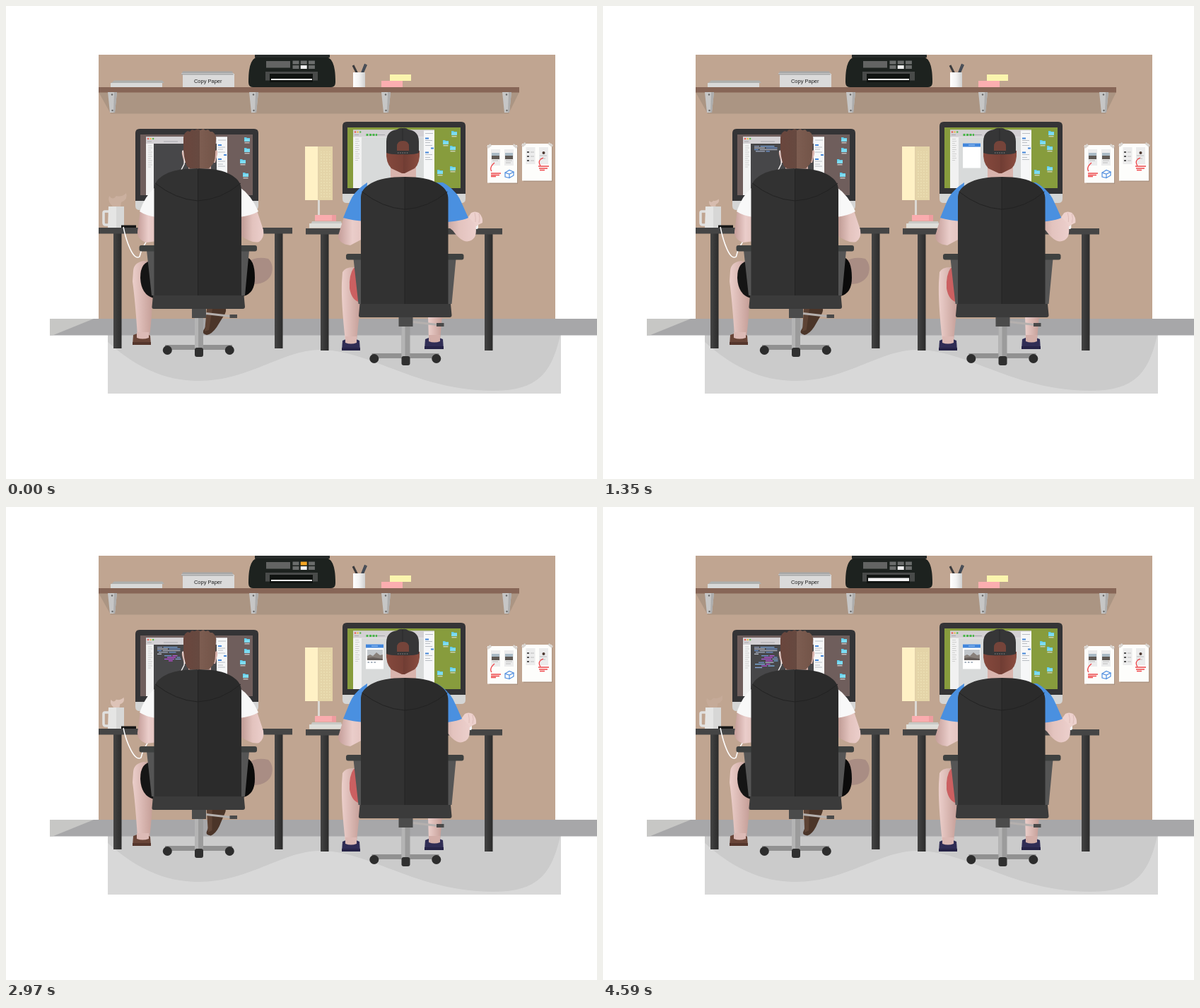
An HTML page that plays this animation: 836x670 px, repeating every 4860 ms.

```html
<!DOCTYPE html>
<html lang="en">
<head>
<meta charset="utf-8">
<title>Two people at work</title>
<style>
  html, body { margin: 0; width: 100%; height: 100%; overflow: hidden; background: #fff; }
  svg { display: block; width: 100vw; height: 100vh; }
  text { font: 7.5px "Liberation Sans", Arial, sans-serif; }
</style>
</head>
<body>
<svg viewBox="0 0 836 670" xmlns="http://www.w3.org/2000/svg">
  <defs>
    <linearGradient id="skin">
      <stop offset="0" stop-color="#eccfcb"/><stop offset="1" stop-color="#c49d96"/>
    </linearGradient>
    <linearGradient id="skinBack">
      <stop offset="0" stop-color="#c49d98"/><stop offset=".55" stop-color="#eacdca"/><stop offset="1" stop-color="#e3c3bf"/>
    </linearGradient>
    <linearGradient id="skinFront">
      <stop offset="0" stop-color="#b9948d"/><stop offset=".55" stop-color="#e3c3be"/><stop offset="1" stop-color="#eccfcc"/>
    </linearGradient>
    <linearGradient id="leg">
      <stop offset="0" stop-color="#444"/><stop offset="1" stop-color="#2b2b2b"/>
    </linearGradient>
    <linearGradient id="cup">
      <stop offset="0" stop-color="#fff"/><stop offset=".5" stop-color="#f2f2f2"/><stop offset="1" stop-color="#cfcfcf"/>
    </linearGradient>
    <linearGradient id="hair">
      <stop offset="0" stop-color="#6a463d"/><stop offset=".5" stop-color="#664940"/>
      <stop offset=".5" stop-color="#7d5d51"/><stop offset="1" stop-color="#735448"/>
    </linearGradient>
    <linearGradient id="redHair">
      <stop offset="0" stop-color="#85493d"/><stop offset=".5" stop-color="#784137"/>
      <stop offset=".5" stop-color="#6f3c33"/><stop offset="1" stop-color="#8a4d40"/>
    </linearGradient>
    <pattern id="dots" width="4" height="4" patternUnits="userSpaceOnUse">
      <circle cx="2" cy="2" r=".8" fill="#f2e7bd"/>
    </pattern>

    <g id="folder">
      <path d="M-4-3h3l1 1h4v5h-8z" fill="#62cdea"/>
      <path d="M-3-1h7v4h-8z" fill="#7fdcf2"/>
      <path d="M-3.500 4.800h7" stroke="#e8e8e8" stroke-width="1"/>
    </g>

    <g id="bracket">
      <path d="M-6 122H7L4 151H-3Z" fill="#c6c6c6"/>
      <path d="M3 122H7L4 151H2Z" fill="#adadad"/>
      <circle cy="125.500" r="1.200" fill="#666"/><circle cx=".5" cy="148" r="1.200" fill="#666"/>
    </g>

    <g id="monitor">
      <path d="M183 270V283Q183 289 189 289H351Q357 289 357 283V270Z" fill="#d4d5d5"/>
      <path d="M183 276V180Q183 174 189 174H351Q357 174 357 180V276Z" fill="#343436"/>
    </g>

    <g id="win">
      <rect x="198" y="185" width="115" height="83" fill="#f1f1f1"/>
      <rect x="198" y="185" width="115" height="10" fill="#d3d0d3"/>
      <circle cx="201" cy="188" r="1.200" fill="#ee5b54"/>
      <circle cx="204.600" cy="188" r="1.200" fill="#f0c04c"/>
      <circle cx="208.200" cy="188" r="1.200" fill="#55b54c"/>
      <path d="M200 192h6M223 192h20" stroke="#a9a9ad"/>
      <path d="M201 198h5m-5 3h6m-6 3h4m-4 3h6m-6 3h5m-5 3h6m-6 3h4m-4 3h6m-6 3h5m-5 3h6m-6 3h4" stroke="#cfcfcf"/>
      <rect x="298" y="186" width="15" height="82" fill="#f6f7f8"/>
      <path d="M300 190h11m-11 10h10m-10 3h7m-7 4h10m-10 13h10m-10 4h7m-7 3h10" stroke="#b9bdc3"/>
      <path d="M300 197h5m3 14h4M300 217h5" stroke="#4788d8" stroke-width="2"/>
    </g>

    <g id="chair">
      <rect x="225" y="480" width="95" height="7" fill="#919191"/>
      <rect x="267" y="440" width="12" height="46" fill="#9b9b9b"/>
      <rect x="267" y="440" width="5" height="46" fill="#b4b4b4"/>
      <circle cx="228.300" cy="487.500" r="6.500" fill="#2d2d2d"/>
      <circle cx="316.300" cy="487.500" r="6.500" fill="#2d2d2d"/>
      <rect x="267" y="484" width="12" height="13" rx="3" fill="#303030"/>
      <path d="M283 435.500L318 439.500" stroke="#b5b0ae" stroke-width="3"/>
      <rect x="316.500" y="437" width="10.500" height="5" fill="#4a4a4a"/>
      <rect x="263" y="429" width="20" height="13" fill="#4b4b4b"/>
      <path d="M199 346H212V410H206ZM331 346H344L338 410H331Z" fill="#555"/>
      <rect x="188.500" y="339" width="28" height="8.500" rx="3" fill="#3e4140"/>
      <rect x="327" y="339" width="28" height="8.500" rx="3" fill="#3e4140"/>
      <path d="M209.500 410V262C209 251 214 245 224 239Q240 230 271.500 230V410Z" fill="#323232"/>
      <path d="M333 410V262C333 251 328 245 318 239Q303 230 271.500 230V410Z" fill="#2b2b2b"/>
      <path d="M211 251Q240 274 271.500 276Q305 274 332 251M271.500 231V410" fill="none" stroke="#222"/>
      <path d="M208 410H336.500L338 426Q338 429 335 429H209Q206 429 206.500 426Z" fill="#3b3b3b"/>
    </g>
  </defs>

  <rect width="836" height="670" fill="#fff"/>

  <!-- room -->
  <rect x="131" y="69" width="646" height="374" fill="#c0a591"/>
  <rect x="144" y="466" width="641" height="83" fill="#d8d8d8"/>
  <path d="M144 466V476C180 508 220 531 272 531C345 531 390 487 445 487C515 487 580 545 690 545C752 545 772 520 784 466Z" fill="#cbcbcb"/>
  <rect x="62" y="443" width="774" height="23.500" fill="#a7a7a9"/>
  <path d="M62 443H124L66 466.500H62Z" fill="#c7c7c5"/>

  <!-- shelf -->
  <path d="M131 122H726L711 152.500H148Z" fill="#ab9583"/>
  <rect x="131" y="115" width="595" height="7.500" fill="#876657"/>
  <g id="brackets"></g>
  <rect x="148" y="109" width="73" height="6" fill="#d8d9d8"/>
  <path d="M153 105.500H221L224 109H149Z" fill="#aeb0ae"/>
  <rect x="250" y="96" width="73" height="19" fill="#dadada"/>
  <path d="M250 92.500H320L322 97.500H248Z" fill="#a6a7a7"/>
  <path d="M248 95.500H322" stroke="#c8c8c8"/>
  <text x="285.700" y="108.700" text-anchor="middle" fill="#222">Copy Paper</text>
  <path d="M353 73Q346 77 344 91Q343 97 343 108Q343 115 349 115H460Q466 115 466 108Q466 97 465 91Q463 77 456 73Z" fill="#1d221f"/>
  <rect x="352" y="69" width="106" height="4" fill="#272b2a"/>
  <rect x="368" y="78" width="34" height="9.500" fill="#636463"/>
  <g id="buttons"></g>
  <rect x="367" y="93" width="74" height="12.500" fill="#494b4a"/>
  <path d="M373 96H434V108H373Z" fill="#111412"/>
  <rect id="print" x="375" width="58" fill="#f3f3f3"/>
  <path d="M502 97L508 82M504 97L510 83" stroke="#414954" stroke-width="2"/>
  <path d="M497 96L491 84" stroke="#3b3b3d" stroke-width="3"/>
  <rect x="491" y="94" width="17" height="21" fill="url(#cup)"/>
  <rect x="531" y="106" width="30" height="9" fill="#fbaeb0"/>
  <rect x="543" y="97" width="30" height="9" fill="#faf5ae"/>

  <!-- pinned sheets -->
  <g id="sheets">
    <path d="M682 198H724V252H684ZM731 196H773V249H732Z" fill="#9f8877" opacity=".6"/>
    <rect x="681" y="197" width="42" height="53.500" fill="#fdfdfb"/>
    <rect x="730" y="195" width="42" height="52.500" fill="#fdfdfb"/>
    <path d="M680 199l5-4 2 3-5 4zM718 195l6 4-2 3-5-4zM729 197l5-4 2 3-5 4zM768 193l6 4-2 3-5-4z" fill="#d9d4cf"/>
    <g fill="#ececec">
      <rect x="686" y="203" width="13" height="23"/><rect x="705" y="203" width="13" height="23"/>
      <rect x="735.500" y="200" width="13" height="24"/><rect x="754" y="200" width="13" height="24"/>
    </g>
    <path d="M687 208h11v4h-11zM706 208h11v4h-11z" fill="#a9bac5"/>
    <path d="M687 212h11v5h-11zM706 212h11v5h-11z" fill="#605a55"/>
    <path d="M688 219h8m11 0h9m-9 3h7M742 207h5m-5 6h5m-5 6h5m8-7h10m-10 4h8" stroke="#bbb"/>
    <path d="M737 207h3m-3 6h3m-3 6h3" stroke="#555" stroke-width="2"/>
    <circle cx="760.500" cy="208" r="2" fill="#4b3931"/>
    <g fill="none" stroke="#ee4548" stroke-width="1.300">
      <path d="M691 222Q683 229 687 234M686 237h14m-14 2.500h12m-12 2h7M760 215Q751 219 756 226M753 227h15m-14 3h12m-11 2.500h7"/>
    </g>
    <path d="M706 236l6-3.500 6 2.500-6 3zM706 236v6l6 1.500v-5.500M712 243.500l6-3.500v-5" fill="none" stroke="#4e8de0" stroke-width="1.200"/>
  </g>

  <!-- left monitor -->
  <use href="#monitor"/>
  <rect x="190" y="182" width="159" height="86" fill="#6f5e5c"/>
  <use href="#win"/>
  <rect x="209" y="195" width="89" height="73" fill="#474749"/>
  <g id="code"></g>
  <g id="foldersL"></g>

  <!-- right monitor -->
  <use href="#monitor" x="293" y="-10"/>
  <rect x="483" y="172" width="160" height="86" fill="#879c3d"/>
  <use href="#win" x="293" y="-9.500"/>
  <rect x="503" y="186" width="88" height="72" fill="#d8dada"/>
  <rect x="607" y="176" width="36" height="82" fill="#879c3d"/>
  <path d="M509.500 182.500h3m1.500 0h3m1.500 0h3m1.500 0h2" stroke="#49b749" stroke-width="3"/>
  <rect x="483" y="258" width="160" height="7" fill="#343436"/>
  <rect x="190" y="268" width="159" height="7" fill="#343436"/>
  <g id="app">
    <rect x="509" y="194.500" width="25" height="35" fill="#fff"/>
    <rect x="509" y="194.500" width="25" height="5" fill="#4286db"/>
    <path d="M517 197h9" stroke="#a9cbf3"/>
    <path id="icons" d="M511.500 220h2.500m2 0h2.500m2 0h2.500" stroke="#aab4c0" stroke-width="2"/>
    <g id="photo">
      <rect x="511" y="202" width="22" height="15" fill="#c2c7cb"/>
      <path d="M511 217V211L515 209L519 211L524 206L529 210L533 209V217Z" fill="#89817b"/>
      <path d="M511 217V214L519 213L533 215V217Z" fill="#645c58"/>
    </g>
  </g>
  <g id="foldersR"></g>

  <!-- lamp, desks -->
  <rect x="441" y="274" width="3" height="23" fill="#dcd9d4"/>
  <rect x="423" y="199" width="18.500" height="76" fill="#fff1c5"/>
  <rect x="441.500" y="199" width="20.500" height="76" fill="#e4d4a8"/>
  <rect x="444" y="206" width="16" height="65" fill="url(#dots)"/>
  <path d="M433 305H474L477 314H429Z" fill="#c9c9c5"/>
  <rect x="429" y="308" width="47" height="6.500" fill="#deded9"/>
  <rect x="437" y="296" width="30" height="8.500" fill="#faacae"/>
  <rect x="461" y="296" width="6" height="8.500" fill="#ee9c9f"/>
  <g fill="url(#leg)">
    <rect x="152" y="322" width="11.500" height="163"/><rect x="380" y="322" width="11.500" height="163"/>
    <rect x="445" y="323" width="11.500" height="165"/><rect x="677" y="323" width="11.500" height="165"/>
  </g>
  <rect x="131" y="314" width="274" height="8.500" fill="#454545"/>
  <rect x="424" y="315" width="278" height="8.500" fill="#454545"/>
  <path id="steam" d="M151 284Q143 277 146 269Q151 276 156 269Q164 271 170 265Q173 274 163 278L162 284Z" fill="#e4cac0"/>
  <path d="M146 291H140Q138 291 138 293V307Q138 310 141 310H146" fill="none" stroke="#e0e0df" stroke-width="3.500"/>
  <path d="M145 284H167V314H144Z" fill="#e5e5e4"/>
  <path d="M156 284H167V314H156Z" fill="#d7d7d6"/>
  <rect x="163" y="310.500" width="21" height="3.500" fill="#161616"/>
  <path id="cord" fill="none" stroke="#fff" stroke-width="1.500"/>

  <!-- left person -->
  <path d="M180 375Q181 363 195 361L208 363L207 412Q207 436 203 468H186Q183 420 179 390Z" fill="url(#skin)"/>
  <path d="M208 361Q190 361 190 385Q191 409 209 414Z" fill="#151515"/>
  <path d="M343 362Q355 354 371 358Q380 367 375 381Q368 394 350 394Z" fill="#a98d84"/>
  <path d="M338 355Q352 357 352 385Q352 407 336 411Z" fill="#0b0b0b"/>
  <path d="M180 466Q192 460 204 467L205 480H179Z" fill="#694538"/>
  <path d="M185 462H202V470Q193 473 185 470Z" fill="#dcbab5"/>
  <path d="M179 476H205V480H179Z" fill="#55362c"/>
  <g id="shoe">
    <path d="M284 429H311Q312 434 306 442L298 455Q291 465 284 466Q277 464 279 460L286 448Z" fill="#4b3529"/>
    <path d="M284 429H292L287 459L281 461Z" fill="#5d4335"/>
  </g>
  <path d="M190 289L214 292V333L198 335Q185 330 186 319Z" fill="url(#skinBack)"/>
  <path d="M330 293L355 290L364 317Q366 328 358 334Q348 337 330 324Z" fill="url(#skinFront)"/>
  <path d="M211 257Q197 268 189 291Q198 297 212 299Z" fill="#f8f8f8"/>
  <path d="M331 257Q347 268 357 291Q347 297 330 299Z" fill="#f8f8f8"/>
  <path d="M258 220H290V236H258Z" fill="#d6b0a8"/>
  <path d="M253 205Q248 202 249 210L252 222H254ZM296 205Q300 202 299 210L296 222H294Z" fill="#d9b3ac"/>
  <path d="M250 205Q254 213 252 224L248 232" fill="none" stroke="#f1eeee" stroke-width="1.500"/>
  <path d="M251 205V188Q251 180 257 177L260 178L263 175L267 176L271 174L275 176L279 174L282 176L286 175L289 178L292 178Q298 182 297 190L296 210Q296 222 290 227L287 230H260L256 227Q252 218 251 205Z" fill="url(#hair)"/>
  <use href="#chair"/>

  <!-- right person -->
  <path d="M476 377Q480 369 494 370L502 422Q498 450 496 475H480Q474 420 475 392Z" fill="url(#skin)"/>
  <path d="M597 438H617L614 473H598Z" fill="url(#skin)"/>
  <path d="M500 371H492Q485 380 486 400Q489 418 502 420Z" fill="#cb6061"/>
  <g id="sandals">
    <path d="M476 474Q488 467 500 474L501 488H475Z" fill="#302d55"/>
    <path d="M480 468H496V477Q488 480 480 477Z" fill="#dcb9b4"/>
    <path d="M593 472Q605 465 618 472L619 486H592Z" fill="#302d55"/>
    <path d="M598 466H614V475Q606 478 598 475Z" fill="#d3aea8"/>
    <path d="M475 484H501V488H475ZM592 482H619V486H592Z" fill="#262347"/>
  </g>
  <path d="M478 299L506 302V329L487 339Q470 337 470 325Z" fill="url(#skinBack)"/>
  <path d="M511 250Q492 262 486 278L477 300Q490 304 508 305Z" fill="#4a90e0"/>
  <g id="arm">
    <rect x="658" y="307" width="10" height="9" rx="2" fill="#f4f4f4"/>
    <path d="M653 300L658 293Q663 290 669 293Q675 299 674 307L668 310L663 314L655 313Z" fill="#edd1cd"/>
    <path d="M663 293Q665 300 664 306M669 294Q671 301 669 307" fill="none" stroke="#d9b6b1" stroke-width=".8"/>
    <path d="M612 302L654 299L664 309Q668 330 655 333Q645 336 632 318Z" fill="url(#skinFront)"/>
    <path d="M605 250H618Q638 261 645 280L654 300Q641 306 605 307Z" fill="#4a90e0"/>
  </g>
  <path d="M544 224H580V246H544Z" fill="#d9b4ad"/>
  <path d="M538 205H585Q586 223 578 230L564 237H560L545 230Q537 222 538 205Z" fill="url(#redHair)"/>
  <path d="M538 208V192Q538 177 553 175Q557 172 561 173Q566 172 569 175Q584 177 584 192V208Q576 211 561 210Q546 211 538 208Z" fill="#363637"/>
  <path d="M561 173V191" stroke="#2b2b2c"/>
  <path d="M553 205V199Q553 191 561.500 191Q570 191 570 199V205Z" fill="#75443a"/>
  <path d="M554 208h16" stroke="#777" stroke-width="1.400" stroke-dasharray="1.400 1.800"/>
  <use href="#chair" x="292.500" y="12"/>
</svg>

<script>
const LOOP = 4860, STEP = 270;
const $ = id => document.getElementById(id);
const put = (id, attrs) => { for (const k in attrs) $(id).setAttribute(k, attrs[k]); };

function add(parent, tag, attrs) {
  const el = document.createElementNS("http://www.w3.org/2000/svg", tag);
  for (const k in attrs) el.setAttribute(k, attrs[k]);
  return $(parent).appendChild(el);
}

// Linear value between [step, value] keys.
function track(keys, s) {
  const i = Math.max(1, keys.findIndex(k => k[0] >= s));
  const [a, va] = keys[i - 1], [b, vb] = keys[i];
  return va + (vb - va) * (s - a) / (b - a);
}

[150, 350, 537, 708].forEach(x => add("brackets", "use", { href: "#bracket", x }));
[[341, 189], [341, 204], [335, 220], [339, 239]].forEach(([x, y]) => add("foldersL", "use", { href: "#folder", x, y }));
[[634, 180], [622, 193], [632, 201], [614, 235], [632, 230]].forEach(([x, y]) => add("foldersR", "use", { href: "#folder", x, y }));

const buttons = [];
for (let i = 0; i < 6; i++) {
  buttons.push(add("buttons", "rect", {
    x: 405.5 + i % 3 * 11.2, y: i < 3 ? 77.500 : 84, width: 9, height: 5, fill: i === 4 ? "#eee" : "#6b6d6c"
  }));
}

// Code rows: indent, first word, second word, colour of each word
const rows = [
  [4, 7, 20, "#8f9dbb", "#79a2d8"], [4, 15, 16, "#b9bdc9", "#6f95d0"],
  [4, 6, 25, "#6f95d0", "#a9b0c0"], [6, 13, 10, "#9ca7be", "#6f95d0"],
  [4, 6, 0, "#b9bdc9", "#b9bdc9"], [14, 10, 7, "#6f95d0", "#b45fd4"],
  [18, 12, 5, "#c04bdc", "#6f95d0"], [14, 14, 8, "#b457dd", "#8aa0cf"],
  [20, 10, 6, "#c04bdc", "#72a9dd"], [10, 8, 12, "#6f95d0", "#aab3c6"],
  [5, 14, 6, "#7fb1e0", "#b457dd"], [14, 8, 9, "#b457dd", "#7fb1e0"],
  [5, 11, 0, "#8aa8da", "#8aa8da"]
].map(([indent, a, b, ca, cb], i) => {
  const y = 198 + i * 2.4, x = 210 + indent;
  const word = (x, w, fill) => ({ w, el: add("code", "rect", { x, y, width: 0, height: 1.3, fill }) });
  return [word(x, a, ca), word(x + a + 1.5, b, cb)];
});

function typeCode(progress) {
  rows.forEach((words, i) => {
    let left = Math.min(1, Math.max(0, progress - i)) * (words[0].w + words[1].w);
    for (const { w, el } of words) {
      const shown = Math.min(w, left);
      el.setAttribute("width", shown);
      left -= shown;
    }
  });
}

const armKeys = [[0, 0], [2, -5], [4, -7], [7, -3], [9, 1], [11, -9], [13, -9.5], [17, -4], [18, 0]];
const shoeKeys = [[0, 0], [2, -8], [4, 0], [7, -5], [9, -9], [11, -9], [13, 0], [15, -8], [17, -8], [18, 0]];
const steamSize = [[0, 1], [2, 1.1], [3, .3], [4, .4], [7, .85], [9, 1], [10, .3], [11, .75], [13, 1.2], [14, 1.2], [17, .9], [18, 1]];
const steamFade = [[0, .3], [2, 0], [3, .5], [4, .8], [7, .3], [8.5, 0], [10, .4], [11, .8], [13, .75], [17, .15], [18, .3]];
const cordKeys = [[0, 0], [4, 0], [7, -2], [9, 2], [11, 2], [13, 0], [17, -1], [18, 0]];
const printKeys = [[0, 2], [11, 2], [13, 4], [17, 4.500], [18, 2]];

function draw(ms) {
  const s = Math.floor(ms % LOOP / STEP);
  typeCode(s * .76);

  put("app", { opacity: s >= 3 ? 1 : 0 });
  put("icons", { opacity: s >= 6 ? 1 : 0 });
  put("photo", { opacity: Math.min(1, Math.max(0, (s - 7) * .4)) });

  put("arm", { transform: `translate(${track(armKeys, s)} 0)` });
  put("shoe", { transform: `rotate(${track(shoeKeys, s)} 283 430)` });
  put("steam", {
    transform: `translate(156 284) scale(${track(steamSize, s)}) translate(-156 -284)`,
    opacity: track(steamFade, s)
  });
  const dx = track(cordKeys, s);
  put("cord", { d: `M166 313C170 333 ${180 + dx} 362 ${189 + dx} 355Q${192 + dx} 341 ${203 + dx} 328` });

  const h = track(printKeys, s);
  put("print", { y: 105 - h, height: h });
  buttons[1].setAttribute("fill", s >= 11 && s <= 14 ? "#f5a623" : "#6b6d6c");
}

function tick() {
  draw(performance.now());
  requestAnimationFrame(tick);
}
tick();
</script>
</body>
</html>
```
